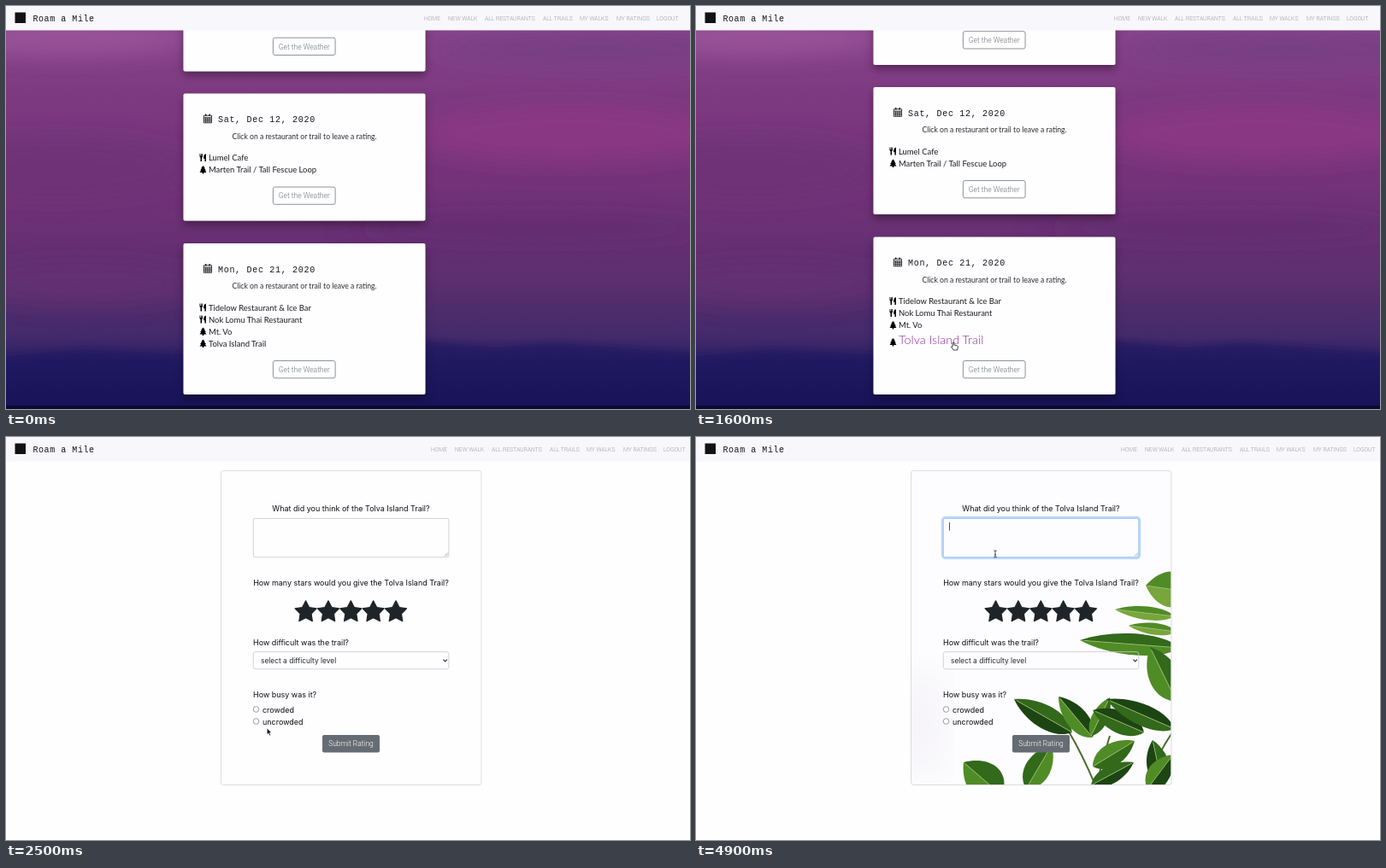
An HTML page for the animation above (5000 ms loop, 800 px wide and 472 px high).

```html
<!DOCTYPE html>
<html lang="en">
<head>
<meta charset="utf-8">
<title>Walk ratings</title>
<style>
  html, body { margin: 0; width: 100%; height: 100%; overflow: hidden; background: #fefdff; }
  svg { display: block; }
  text { white-space: pre; }
  .mono { font: 10px "Liberation Mono", monospace; fill: #16161a; }
  .nav { font: 300 6.75px Roboto, sans-serif; fill: #9c9ba1; }
  .hint { font: 8.65px Lato, sans-serif; fill: #2b2b30; }
  .item { font: 9.45px Lato, sans-serif; fill: #1c1c20; }
  .btn { font: 300 8.5px Roboto, sans-serif; text-anchor: middle; }
  .label { font: 8.98px Inter, sans-serif; fill: #0c0e12; }
  .choice { font: 8.4px Inter, sans-serif; fill: #24282e; }
  .mid { text-anchor: middle; }
  .field { fill: none; stroke: #c6cbd1; stroke-width: .8; }
</style>
</head>
<body>
<svg width="800" height="472" viewBox="0 0 800 472">
  <defs>
    <linearGradient id="sky" x2="0" y2="1">
      <stop offset="0" stop-color="#8c488f"/>
      <stop offset=".22" stop-color="#7d3a80"/>
      <stop offset=".45" stop-color="#743278"/>
      <stop offset=".66" stop-color="#5f2f70"/>
      <stop offset=".82" stop-color="#432a6b"/>
      <stop offset=".88" stop-color="#2a1f64"/>
      <stop offset="1" stop-color="#140f4e"/>
    </linearGradient>
    <filter id="blur" x="-50%" y="-100%" width="200%" height="300%"><feGaussianBlur stdDeviation="26 12"/></filter>
    <filter id="soft" x="-20%" y="-60%" width="140%" height="220%"><feGaussianBlur stdDeviation="5 3"/></filter>
    <filter id="shadow" x="-10%" y="-20%" width="120%" height="150%">
      <feDropShadow dx="0" dy="5" stdDeviation="5" flood-color="#000" flood-opacity=".35"/>
    </filter>
    <clipPath id="frame"><rect x="251.5" y="39.5" width="304" height="367.5" rx="3"/></clipPath>
    <path id="tree" d="M4 0 6.3 2.8H5.4L7.4 5.4H6.3L8 8H4.8V9.4H3.2V8H0L1.7 5.4H.6L2.6 2.8H1.7Z"/>
    <path id="fork" d="M0 0H.8V2.6H1.4V0H2.1V2.6H2.7V0H3.5V3.2Q3.5 4.2 2.6 4.6V9H1V4.6Q0 4.2 0 3.2ZM7.4 0V9H5.9V5.7H4.6Q4.3 .8 7.4 0Z"/>
    <g id="calendar" fill="none" stroke="#222226" stroke-width=".9">
      <path d="M.5 1.8H9.7V10.3H.5ZM.5 4.2H9.7M.5 6.2H9.7M.5 8.2H9.7M2.8 4.2V10.3M5.1 4.2V10.3M7.4 4.2V10.3"/>
      <path d="M2.9 0V2.6M7.3 0V2.6" stroke-width="1.5"/>
    </g>
  </defs>

  <g id="walks">
    <rect width="800" height="472" fill="url(#sky)"/>
    <g filter="url(#blur)">
      <ellipse cx="70" cy="38" rx="150" ry="20" fill="#a05a9f" opacity=".7"/>
      <ellipse cx="660" cy="150" rx="190" ry="34" fill="#953886" opacity=".6"/>
      <ellipse cx="690" cy="50" rx="180" ry="18" fill="#6d3c86" opacity=".6"/>
      <ellipse cx="60" cy="190" rx="160" ry="36" fill="#693275" opacity=".6"/>
      <ellipse cx="620" cy="260" rx="200" ry="16" fill="#5d2f73" opacity=".5"/>
      <ellipse cx="90" cy="325" rx="140" ry="26" fill="#6c3577" opacity=".5"/>
    </g>
    <path filter="url(#soft)" fill="#1d1960" opacity=".6" d="M-20 412 90 402 200 408 490 392 570 400 640 394 820 408V490H-20Z"/>
    <rect y="468" width="800" height="4" fill="#0c0930"/>
    <g id="cards"></g>
  </g>

  <g id="form">
    <rect width="800" height="472" fill="#fefdff"/>
    <g id="photo" clip-path="url(#frame)">
      <rect x="251" y="39" width="305" height="369" fill="#fdfcfe"/>
      <ellipse cx="262" cy="335" rx="20" ry="70" fill="#f2f0f5" filter="url(#blur)"/>
      <path d="M436 345Q452 372 468 410M468 410Q476 375 484 350M526 410Q540 370 558 345" fill="none" stroke="#4d6b2c" stroke-width="2"/>
      <g id="leaves"></g>
    </g>
    <rect x="251.5" y="39.5" width="304.5" height="368" rx="3" fill="none" stroke="#dcdbe0"/>
    <text class="label mid" x="403.5" y="87">What did you think of the Tolva Island Trail?</text>
    <rect id="glow" x="287.9" y="93.9" width="231.2" height="48.2" rx="3.5" fill="none" stroke="#bfd9fb" stroke-width="2.2"/>
    <rect id="area" class="field" x="289.3" y="95.4" width="228.5" height="45.4" rx="2"/>
    <path d="M513 139.5 516.8 135.7M515 139.5 516.8 137.7" stroke="#777" stroke-width=".6"/>
    <path id="caret" d="M296.5 100V109.5" stroke="#222" stroke-width=".8"/>
    <text class="label mid" x="403.5" y="173.5">How many stars would you give the Tolva Island Trail?</text>
    <g id="stars" fill="#1f2428" stroke="#1f2428" stroke-width="1.2" stroke-linejoin="round"></g>
    <text class="label" x="289" y="243.5">How difficult was the trail?</text>
    <rect class="field" x="289.3" y="251.6" width="228.5" height="20.2" rx="2.5"/>
    <text class="choice" x="298" y="265">select a difficulty level</text>
    <path d="M511.4 260.6 513.7 263 516 260.6" fill="none" stroke="#333" stroke-width="1.2"/>
    <text class="label" x="289" y="304.5">How busy was it?</text>
    <g fill="#fff" stroke="#74747a" stroke-width=".7"><circle cx="292.5" cy="319" r="3.3"/><circle cx="292.5" cy="333" r="3.3"/></g>
    <text class="label" x="300" y="322.5">crowded</text>
    <text class="label" x="300" y="336.5">uncrowded</text>
    <rect x="370" y="349" width="67" height="20.5" rx="2" fill="#666c73"/>
    <text class="btn" x="403.5" y="362.3" fill="#fff">Submit Rating</text>
    <rect id="status" y="469" width="140" height="3" fill="#dcdbde"/>
  </g>

  <rect width="800" height="28.5" fill="#f8f7fb"/>
  <rect x="10.5" y="7.5" width="12.5" height="12.5" fill="#121214"/>
  <text class="mono" x="31.5" y="17.5" letter-spacing=".55">Roam a Mile</text>
  <g id="links"></g>

  <g id="pointer">
    <path id="arrow" d="M0 0V7.6L1.8 6 3 8.8 4.4 8.2 3.2 5.5H5.6Z" fill="#000" stroke="#fff" stroke-width=".7"/>
    <path id="hand" d="M-.9 .4Q0-.6 .8 .4V3L4.6 3.8Q5.6 4.2 5.3 6L4.6 9H.4L-2.4 5.4Q-2.6 4.2-.9 5Z" fill="#fff" stroke="#111" stroke-width=".8"/>
    <path id="beam" d="M-1.8-4Q0-4 0-3V3Q0 4-1.8 4M1.8-4Q0-4 0-3M0 3Q0 4 1.8 4M-1 1H1" fill="none" stroke="#222" stroke-width=".8"/>
  </g>
</svg>
<script>
const $ = id => document.getElementById(id);
const show = (id, on) => $(id).setAttribute('display', on ? 'inline' : 'none');
const clamp = v => Math.max(0, Math.min(1, v));
const ease = v => v * v * (3 - 2 * v);

const button = y => `<rect x="312.4" y="${y}" width="72.7" height="20.3" rx="2.2" fill="#fff" stroke="#73787e" stroke-width=".8"/>
  <text class="btn" x="348.8" y="${y + 13.3}" fill="#6c7278">Get the Weather</text>`;
const panel = (y, h) => `<rect x="207.5" y="${y}" width="283" height="${h}" rx="2" fill="#fefdff" filter="url(#shadow)"/>`;

// The last trail grows by `grow` (0 to 1) when hovered and makes its card taller.
function card(y, date, items, grow = 0) {
  const h = 121 + 14 * items.length + 7.5 * grow;
  const rows = items.map(([icon, name], i) => {
    const hot = i === 3 ? grow : 0, base = y + 78.5 + 14 * i + 5 * hot;
    const style = hot ? `font-size:${9.45 + 4.9 * hot}px;font-weight:300;fill:color-mix(in srgb,#8f2f9a ${hot * 100}%,#1c1c20)` : '';
    return `<use href="#${icon}" x="226.5" y="${base - 8 + hot}"/>
      <text class="item" x="237" y="${base}" style="${style}">${name}</text>`;
  });
  return panel(y, h) + `<use href="#calendar" x="230.8" y="${y + 24}"/>
    <text class="mono" x="248" y="${y + 33.5}" letter-spacing=".7">${date}</text>
    <text class="hint mid" x="349" y="${y + 53}">Click on a restaurant or trail to leave a rating.</text>`
    + rows.join('') + button(y + h - 39.5);
}

let drawn = -1;
function drawCards(grow) {
  if (grow === drawn) return;
  drawn = grow;
  const up = -7.5 * grow;
  $('cards').innerHTML = panel(-40 + up, 116.5) + button(37.2 + up)
    + card(102.5 + up, 'Sat, Dec 12, 2020', [['fork', 'Lumel Cafe'], ['tree', 'Marten Trail / Tall Fescue Loop']])
    + card(278 + up, 'Mon, Dec 21, 2020', [['fork', 'Tidelow Restaurant &amp; Ice Bar'],
      ['fork', 'Nok Lomu Thai Restaurant'], ['tree', 'Mt. Vo'], ['tree', 'Tolva Island Trail']], grow);
}

// Leaf from stem point to tip: two halves and a midrib.
function leaf(x, y, tipX, tipY, width, right, left) {
  const len = Math.hypot(tipX - x, tipY - y), turn = Math.atan2(tipY - y, tipX - x) * 180 / Math.PI;
  const half = s => `M0 0C${len * .2} ${s * width * .75} ${len * .7} ${s * width * .65} ${len} 0Z`;
  return `<g transform="translate(${x} ${y}) rotate(${turn})"><path d="${half(1)}" fill="${right}"/>
    <path d="${half(-1)}" fill="${left}"/><path d="M0 0H${len * .95}" stroke="#9dbd6c" stroke-width=".8"/></g>`;
}
const deep = '#1d4513', green = '#32691b', fresh = '#508c26', pale = '#76a63c';
$('leaves').innerHTML = [
  [580, 182, 526, 174, 40, fresh, pale], [560, 210, 490, 202, 15, fresh, pale],
  [562, 228, 506, 221, 13, fresh, pale], [566, 247, 449, 238, 24, green, fresh],
  [562, 310, 531, 246, 34, green, fresh], [440, 346, 372, 307, 26, green, deep],
  [464, 352, 424, 304, 24, deep, fresh], [462, 350, 484, 305, 18, green, fresh],
  [524, 346, 464, 320, 25, deep, green], [560, 342, 480, 307, 24, deep, green],
  [386, 412, 416, 361, 28, fresh, green], [358, 420, 313, 381, 40, green, fresh],
  [464, 386, 513, 356, 25, green, fresh], [462, 408, 512, 381, 20, deep, green],
  [546, 410, 534, 355, 25, green, deep], [528, 412, 558, 372, 25, deep, fresh]
].map(spec => leaf(...spec)).join('');

const star = Array.from({ length: 10 }, (_, i) => {
  const r = i % 2 ? 6.8 : 13.2, a = (i / 5 - .5) * Math.PI;
  return [r * Math.cos(a), r * Math.sin(a)];
}).join(' ');
$('stars').innerHTML = [0, 1, 2, 3, 4].map(i =>
  `<polygon points="${star}" transform="translate(${350.6 + 26.35 * i} 205)"/>`).join('');

$('links').innerHTML = [[489, 'HOME'], [517, 'NEW WALK'], [560, 'ALL RESTAURANTS'], [628, 'ALL TRAILS'],
  [671, 'MY WALKS'], [714, 'MY RATINGS'], [761, 'LOGOUT']]
  .map(([x, name]) => `<text class="nav" x="${x}" y="16.8">${name}</text>`).join('');

// Pointer keys: time, x, y
const path = [[700, 187, 469], [1300, 306, 400], [1600, 301, 394], [2000, 298, 393], [2400, 298, 393],
  [2800, 344, 60], [2900, 352, 28], [3000, 354, 48], [3100, 355, 101], [3400, 350, 137], [5000, 350, 137]];
function pointerAt(t) {
  const i = Math.max(1, path.findIndex(key => key[0] > t));
  const [t0, x0, y0] = path[i - 1], [t1, x1, y1] = path[i];
  const k = ease(clamp((t - t0) / (t1 - t0)));
  return [x0 + (x1 - x0) * k, y0 + (y1 - y0) * k];
}

const focusAt = 3880;
function render(now) {
  const t = Math.floor(now % 5000 / 100) * 100;   // ten steps per second
  const rating = t >= 2100, hand = t >= 1300 && t < 2000, beam = t >= 3200;
  show('walks', !rating);
  show('form', rating);
  drawCards(ease(clamp((t - 1300) / 200)));
  $('links').setAttribute('transform', `translate(${rating ? 8 : 0} 0)`);
  show('status', t < 2400);
  show('photo', t >= 2600);

  const focus = clamp((t - focusAt) / 150);
  $('glow').setAttribute('opacity', focus);
  $('area').style.stroke = focus ? '#82b8f8' : '';
  show('caret', focus && Math.floor((t - focusAt) / 500) % 2 === 0);

  show('pointer', t >= 700);
  $('pointer').setAttribute('transform', `translate(${pointerAt(t)})`);
  show('hand', hand);
  show('beam', beam);
  show('arrow', !hand && !beam);
}

const start = performance.now();
(function loop() {
  render(performance.now() - start);
  requestAnimationFrame(loop);
})();
</script>
</body>
</html>
```
